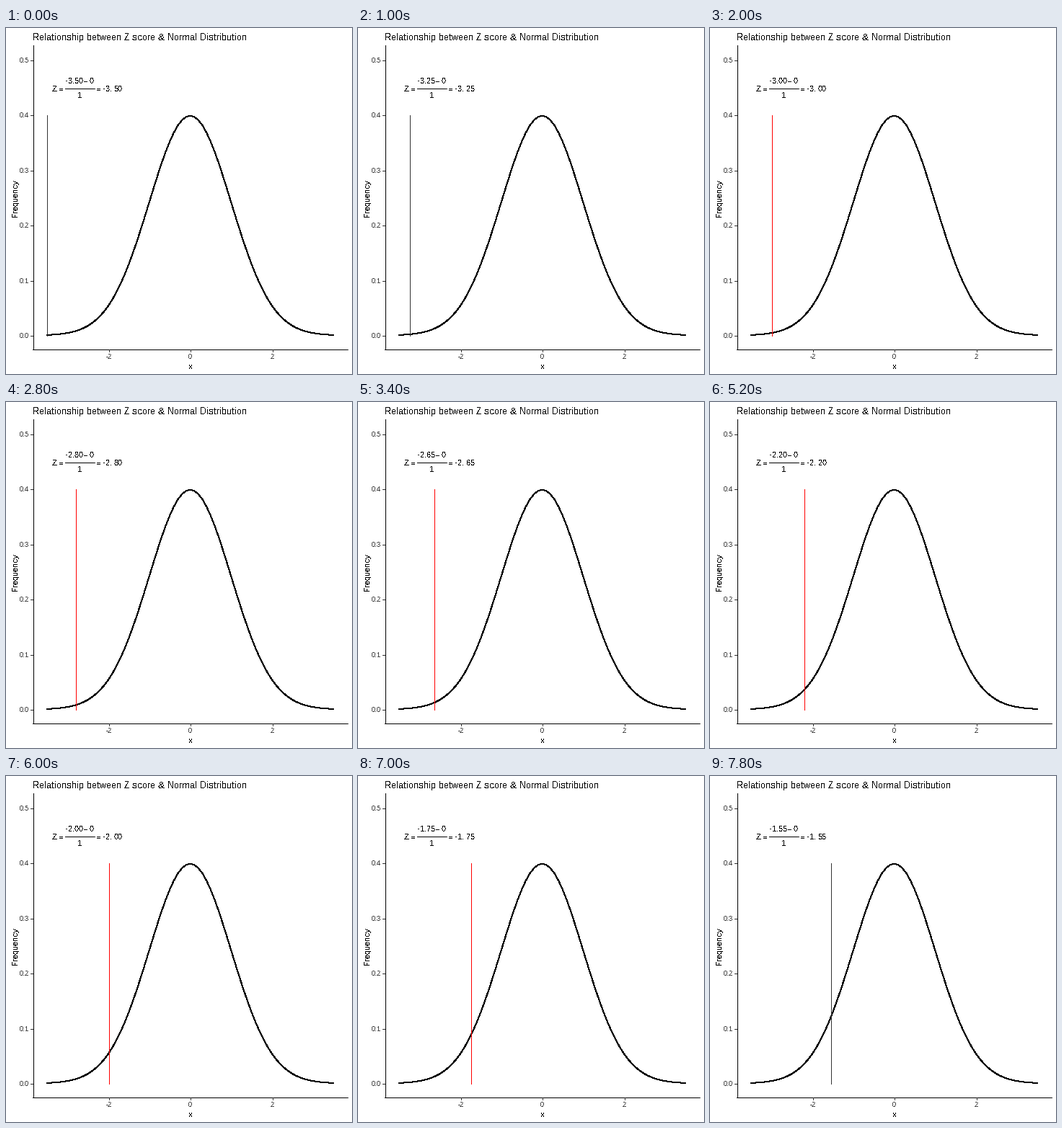
Animation, 480 px wide and 480 px high, one loop 8000 ms. Source, as a matplotlib script:

```python
import numpy as np
import matplotlib.pyplot as plt
from matplotlib.animation import FuncAnimation

PX = 0.75  # points per pixel at 96 dpi
FRAMES, STEP_MS = 40, 200

plt.rcParams.update({
    "font.family": "Liberation Sans",
    "text.hinting": "native",
    "text.hinting_factor": 1,
    "text.antialiased": False,
    "axes.unicode_minus": False,
})

fig = plt.figure(figsize=(5, 5), dpi=96, facecolor="white")
ax = fig.add_axes([0, 0, 1, 1])
ax.set_xlim(0, 480)
ax.set_ylim(480, 0)
ax.axis("off")


def px(x):
    return 255.5 + 56.75 * x


def py(y):
    return 426.5 - 764 * y


def line(xs, ys, color="black"):
    return ax.plot(xs, ys, color=color, lw=PX, antialiased=False,
                   solid_capstyle="butt")[0]


def label(x, y, s, size=11, color="black", ha="left", **kw):
    return ax.text(x, y, s, size=size * PX, color=color, ha=ha,
                   va="baseline", **kw)


# Axes, ticks and titles
line([37.5, 37.5], [24, 446])
line([37, 474], [445.5, 445.5])
for i in range(6):
    y = np.floor(py(i / 10)) + 0.5
    line([34, 37], [y, y], "#333333")
    label(32, y + 3.5, f"{i / 10:.1f}", 9, "#4D4D4D", "right")
for v in (-2, 0, 2):
    x = np.floor(px(v)) + 0.5
    line([x, x], [446, 449], "#333333")
    label(x, 459, str(v), 9, "#4D4D4D", "center")
label(37, 17, "Relationship between Z score & Normal Distribution", 13)
label(255.5, 473, "x", ha="center")
ax.text(15, 236, "Frequency", size=11 * PX, rotation=90,
        ha="right", va="center").set_x(18)

# Density curve
xs = np.linspace(-3.5, 3.5, 71)
line(px(xs), py(np.exp(-xs ** 2 / 2) / np.sqrt(2 * np.pi)))

# Formula
label(64, 88, "Z")
label(73, 88, "=")
line([82, 123], [83.5, 83.5])
label(108, 77, "\u2212")
label(116, 77, "0")
label(99, 97, "1")
label(125, 88, "=")
top = label(82, 77, "")
whole = label(134, 88, "")
cents = label(150, 88, "")
marker = line([0, 0], [120.5, 426.5])


def update(i):
    z = -3.5 + 0.05 * i
    s = f"{z:.2f}"
    top.set_text(s)
    whole.set_text(s[:3])
    cents.set_text(s[3:])
    x = np.floor(px(z)) + 0.5
    marker.set_xdata([x, x])
    marker.set_color("red" if -3.01 < z < -1.645 else "#333333")
    return top, whole, cents, marker


anim = FuncAnimation(fig, update, frames=FRAMES, interval=STEP_MS,
                     repeat=True, repeat_delay=0, blit=False)
plt.show()
```
